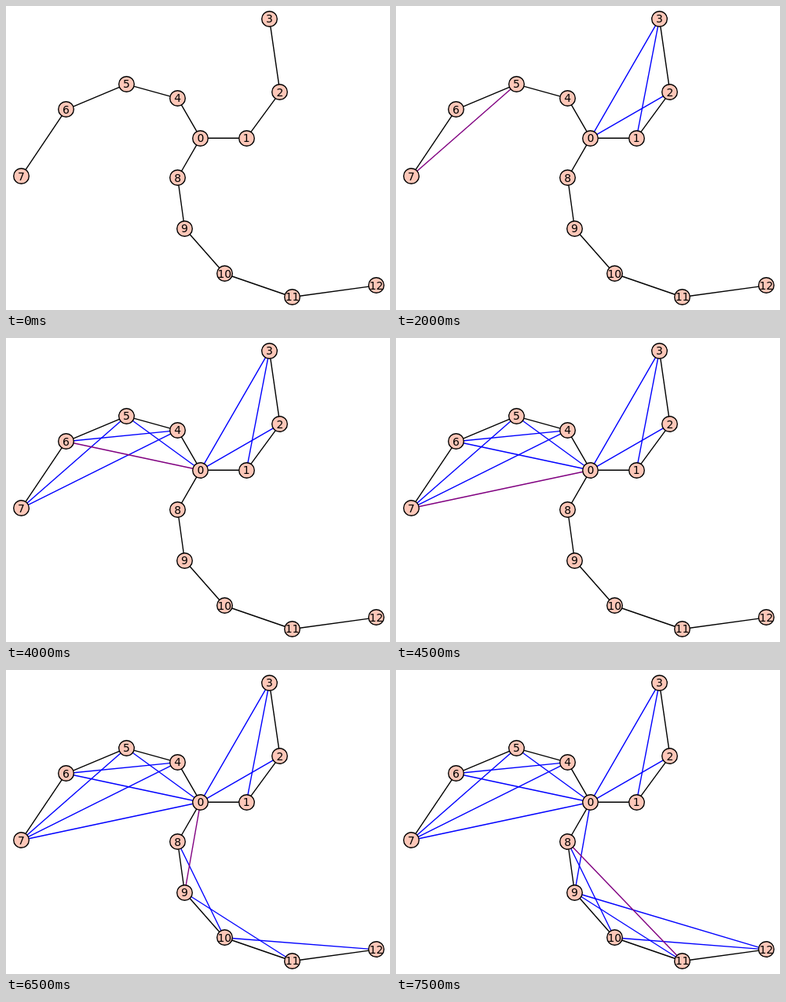
An HTML page that plays this animation: 489x387 px, repeating every 8000 ms.

```html
<!DOCTYPE html>
<html lang="en">
<head>
<meta charset="utf-8">
<title>Graph edges</title>
<style>
  html, body { margin: 0; width: 489px; height: 387px; overflow: hidden; background: #fff; }
  svg { display: block; }
  line { stroke: #000; stroke-width: 1.39; }
  circle { fill: #fec7b8; stroke: #000; stroke-width: 1.39; }
  text { font: 13.9px "DejaVu Sans", sans-serif; text-anchor: middle; }
  .hidden { visibility: hidden; }
  .new { stroke: #800080; }
  .old { stroke: #00f; }
</style>
</head>
<body>
<svg width="489" height="387" viewBox="0 0 489 387">
  <g id="edges"></g>
  <g id="nodes"></g>
</svg>
<script>
  const STEP = 500, LOOP = 8000;
  const HUB = { x: 247.8, y: 168.2 }, SPACING = 58.4;
  const SECTOR = 2 * Math.PI / 3;

  const edges = document.getElementById("edges");
  const nodes = document.getElementById("nodes");

  // Each arm spirals out through its own third of the circle.
  function makeArm(length, index) {
    const arm = [HUB];
    for (let k = 1; k <= length; k++) {
      const angle = SECTOR * (index + (k - 1) / (length + 1));
      arm.push({
        x: HUB.x + SPACING * k * Math.cos(angle),
        y: HUB.y - SPACING * k * Math.sin(angle)
      });
    }
    return arm;
  }

  function add(parent, tag, attrs) {
    const el = document.createElementNS("http://www.w3.org/2000/svg", tag);
    for (const key in attrs) el.setAttribute(key, attrs[key]);
    return parent.appendChild(el);
  }

  // Joins nodes that lie `gap` apart on an arm, outermost pair first.
  function link(arm, gap) {
    const lines = [];
    for (let i = arm.length - 1 - gap; i >= 0; i--) {
      const a = arm[i], b = arm[i + gap];
      lines.push(add(edges, "line", { x1: a.x, y1: a.y, x2: b.x, y2: b.y }));
    }
    return lines;
  }

  function addNode({ x, y }, label) {
    // Discs sit on pixel centres.
    add(nodes, "circle", { cx: Math.floor(x) + 0.5, cy: Math.floor(y) + 0.5, r: 9.8 });
    add(nodes, "text", { x, y: Math.round(y + 4.8) }).textContent = label;
  }

  const arms = [3, 4, 5].map(makeArm);
  const chords = [];

  arms.forEach(arm => link(arm, 1));
  for (const arm of arms)
    for (let gap = 2; gap < arm.length; gap++) chords.push(...link(arm, gap));

  [HUB, ...arms.flatMap(arm => arm.slice(1))].forEach(addNode);

  // One chord appears per step; the latest one is highlighted.
  function draw() {
    const newest = Math.floor(performance.now() % LOOP / STEP) - 1;
    chords.forEach((line, i) => {
      line.setAttribute("class", i > newest ? "hidden" : i === newest ? "new" : "old");
    });
    requestAnimationFrame(draw);
  }
  draw();
</script>
</body>
</html>
```
